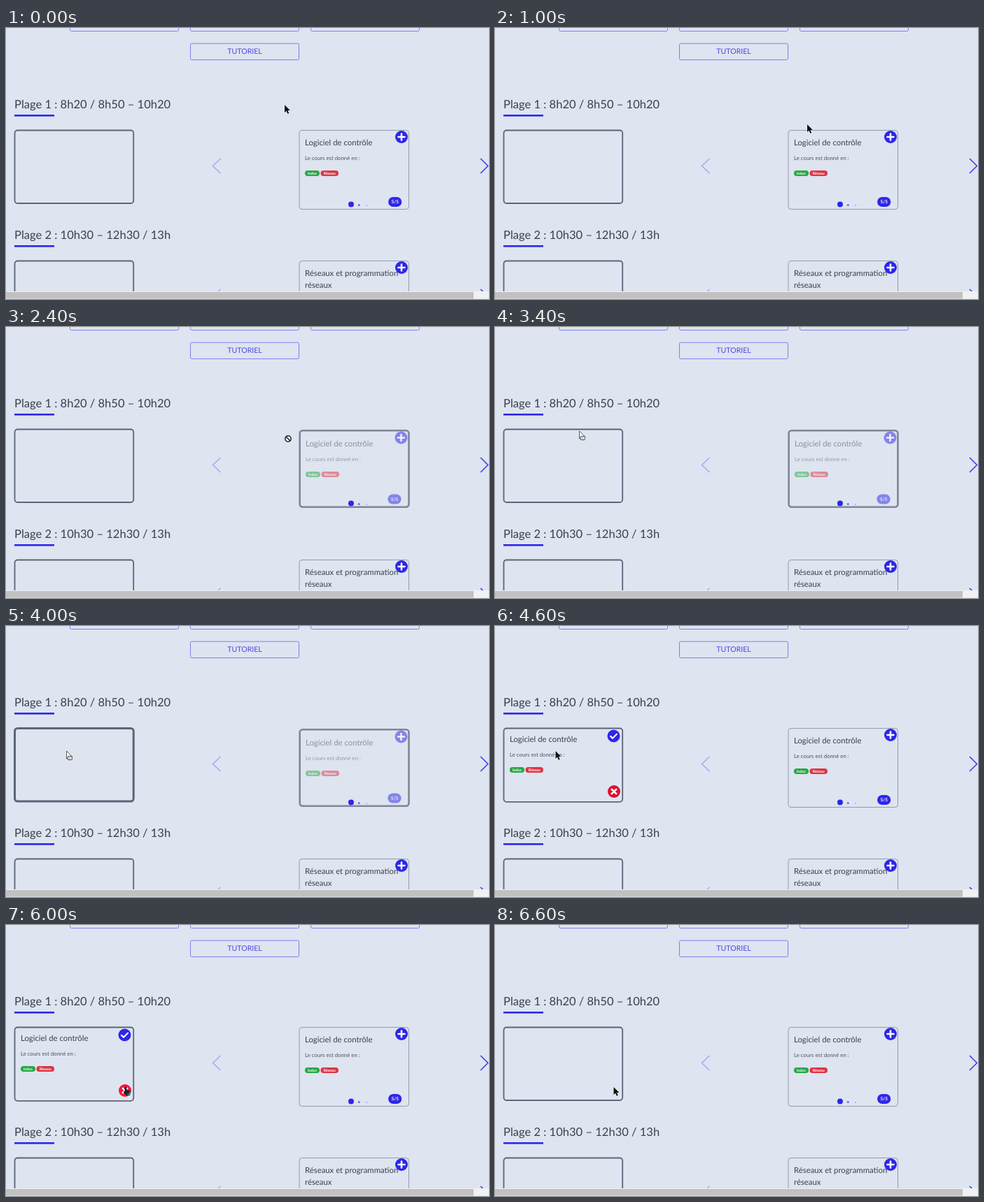
Recreate the animation shown at these times as an HTML page. Size 690 by 388 pixels, loop 8600 ms.

```html
<!DOCTYPE html>
<html lang="fr">
<head>
<meta charset="utf-8">
<style>
html, body { margin: 0; width: 100%; height: 100%; overflow: hidden; background: #dee4f0; }
svg { display: block; width: 690px; height: 388px; font-family: Lato, sans-serif; fill: none; text-rendering: geometricPrecision; }
text { fill: #3a404c; }
.h { font-size: 16.55px; }
.title { font-size: 11.35px; }
.sub { font-size: 7.8px; fill: #4d5461; }
.tag { font-size: 5.3px; font-weight: 700; fill: #fff; text-anchor: middle; }
.btn { stroke: #817ef0; }
.slot { stroke: #5c6579; stroke-width: 1.8; }
.card { stroke: #929aac; }
.blue { fill: #2d27e8; }
.sign { stroke: #fff; stroke-width: 2.6; stroke-linecap: round; stroke-linejoin: round; }
.chev { stroke-width: 1.5; }
</style>
</head>
<body>
<svg id="stage" viewBox="0 0 690 388"></svg>
<script>
const rect = (x, y, w, h, r, attrs) =>
  `<rect x="${x}" y="${y}" width="${w}" height="${h}" rx="${r}" ${attrs}/>`;
const text = (x, y, cls, s) => `<text x="${x}" y="${y}" class="${cls}">${s}</text>`;
const disc = (x, y, r, attrs = 'class="blue"') => `<circle cx="${x}" cy="${y}" r="${r}" ${attrs}/>`;
const plus = (x, y) => disc(x, y, 9) + `<path class="sign" d="M${x - 4.5} ${y}h9m-4.5-4.5v9"/>`;

// Title, subtitle and tags of the course; (x, y) is the title baseline
const course = (x, y) =>
  text(x, y, 'title', 'Logiciel de contrôle') +
  text(x, y + 21, 'sub', 'Le cours est donné en :') +
  rect(x, y + 36, 21, 8, 4, 'fill="#28a745"') + text(x + 10.5, y + 41.8, 'tag', 'Indus') +
  rect(x + 22.5, y + 36, 25.5, 8, 4, 'fill="#dc3545"') + text(x + 35.2, y + 41.8, 'tag', 'Réseau');

const badge = (x, y) =>
  rect(x - 9.6, y - 7, 19.2, 14, 7, 'class="blue"') +
  `<text x="${x}" y="${y + 2.2}" class="tag" style="font-size:6.5px">5/5</text>`;

const row = (dy, heading) => `<g transform="translate(0 ${dy})">
  ${text(12, 115, 'h', heading)}
  ${rect(12, 124, 57, 2.6, 0, 'fill="#2d28ea"')}
  <path class="chev" stroke="#a9a7f3" d="M306.5 187 295.5 197.5l11 10.5"/>
  <path class="chev" stroke="#3f3ae8" d="M678 187l10.5 10.5-10.5 10.5"/>
</g>`;

const arrow = 'M0 0v11l2.500-2.200 1.800 4 2-.9-1.800-3.900h3.400z';
const cursors = {
  arrow: `<path d="${arrow}" fill="#111" stroke="#fff" stroke-width=".8" paint-order="stroke"/>`,
  no: disc(0, 0, 5, 'fill="#fff"') +
    '<path stroke="#16191f" stroke-width="1.5" d="M-4.2 0a4.2 4.2 0 1 0 8.4 0a4.2 4.2 0 1 0-8.4 0M-3-3l6 6"/>',
  copy: `<path d="${arrow}" fill="#fff" stroke="#333" stroke-width=".8"/>` +
    rect(1.8, 7.5, 6, 5, .5, 'fill="#fff" stroke="#333" stroke-width=".9"') +
    '<path stroke="#333" stroke-width=".7" d="M3.3 10h3"/>',
  hand: '<path d="M0 .8q1-1.5 2 0v4l4.5 1q1.3.4 1 2l-.8 3.7h-5l-3.5-4.3q0-1.3 1.8-.2z" fill="#1d2529" stroke="#111" stroke-width=".8"/>' +
    '<path d="M3.2 10.3h3.300l.6-3.400" stroke="#3fae9f" stroke-width="1.3"/>'
};

const stage = document.getElementById('stage');
stage.innerHTML = `
  ${[91.5, 263.5, 435.5].map(x => rect(x, -20, 155, 24.5, 2, 'class="btn"')).join('')}
  ${rect(263.5, 22.2, 155, 23.4, 2, 'class="btn"')}
  <text x="341" y="36.6" font-size="10.6" text-anchor="middle" style="fill:#4c48e2">TUTORIEL</text>
  ${row(0, 'Plage 1 : 8h20 / 8h50 – 10h20')}
  ${row(187, 'Plage 2 : 10h30 – 12h30 / 13h')}
  ${rect(12.5, 146.5, 169.7, 104.5, 4, 'class="slot" id="slot"')}
  ${rect(12.5, 333.5, 169.7, 104.5, 4, 'class="slot"')}
  <g id="idle">
    ${rect(419, 146.5, 156.5, 113, 4, 'class="card"')}
    ${course(427, 168) + plus(565, 156) + badge(555.7, 249)}
  </g>
  <g id="dragged">
    ${rect(419.7, 148.2, 155.8, 109.5, 4, 'stroke="#7f8696" stroke-width="2.6"')}
    <g opacity=".5">${course(428, 171) + plus(564.5, 158.5) + badge(555, 246.5)}</g>
  </g>
  ${disc(493, 252.5, 4) + disc(504.3, 253.6, 1.4, 'fill="#5a55f0"') + disc(515, 254, .7, 'fill="#6f6bee"')}
  ${rect(419, 333.5, 156.5, 113, 4, 'class="card"')}
  ${text(427, 355.3, 'title', 'Réseaux et programmation') + text(427, 372, 'title', 'réseaux') + plus(565, 343)}
  <g id="dropped">
    ${course(21, 166) + disc(169.5, 157.5, 9)}
    <path class="sign" style="stroke-width:2.2" d="M165 157.8l3 3 6-6"/>
    ${disc(170, 237, 9, 'id="remove"')}
    <path class="sign" d="M166.8 233.8l6.4 6.4m0-6.4l-6.4 6.4"/>
  </g>
  ${rect(0, 377, 690, 11, 0, 'fill="#f0f1f3"') + rect(0, 378, 668, 9.5, 0, 'fill="#c1c1c2"')}
  <g id="cursor"></g>`;

// Pointer positions, each held until the next: time, x, y, shape
const steps = [
  [0, 398, 110, 'arrow'], [800, 439, 134, 'arrow'], [1000, 446, 138, 'arrow'],
  [1400, 497, 178, 'arrow'], [1600, 505, 184, 'arrow'], [2200, 447, 165, 'arrow'],
  [2400, 403, 160, 'no'], [2500, 370, 153, 'no'], [2600, 336, 146, 'no'],
  [2800, 261, 136, 'no'], [3000, 218, 135, 'no'], [3200, 159, 138, 'no'],
  [3400, 120.5, 149, 'copy'], [3600, 104, 163, 'copy'], [3800, 98, 170, 'copy'],
  [3900, 92, 176, 'copy'], [4000, 86.5, 179, 'copy'], [4600, 86.5, 179, 'arrow'],
  [4900, 91, 181, 'arrow'], [5000, 97, 184, 'arrow'], [5200, 102, 184, 'arrow'],
  [5400, 114, 184, 'arrow'], [5600, 163, 213, 'arrow'], [5800, 169, 230, 'hand'],
  [6000, 170, 232, 'hand'], [6600, 169.5, 232, 'arrow']
];

const byId = id => document.getElementById(id);
const show = (id, on) => byId(id).setAttribute('visibility', on ? 'visible' : 'hidden');
let shape;

function draw(now) {
  const t = now % 8600;
  const within = (from, to) => t >= from && t < to;
  const [, x, y, kind] = steps.findLast(s => s[0] <= t);
  if (kind !== shape) byId('cursor').innerHTML = cursors[shape = kind];
  byId('cursor').setAttribute('transform', `translate(${x} ${y})`);

  const dragging = within(2400, 4600);
  const filled = within(4600, 6600);
  show('idle', !dragging);
  show('dragged', dragging);
  show('dropped', filled);
  // A filled slot is slightly taller than an empty one
  byId('slot').setAttribute('height', filled ? 105.3 : 104.5);
  byId('slot').style.strokeWidth = within(3600, 4600) ? 3 : 1.8;
  byId('remove').setAttribute('fill', within(5800, 6600) ? '#f0183f' : '#db1230');
  requestAnimationFrame(draw);
}
draw(performance.now());
</script>
</body>
</html>
```
